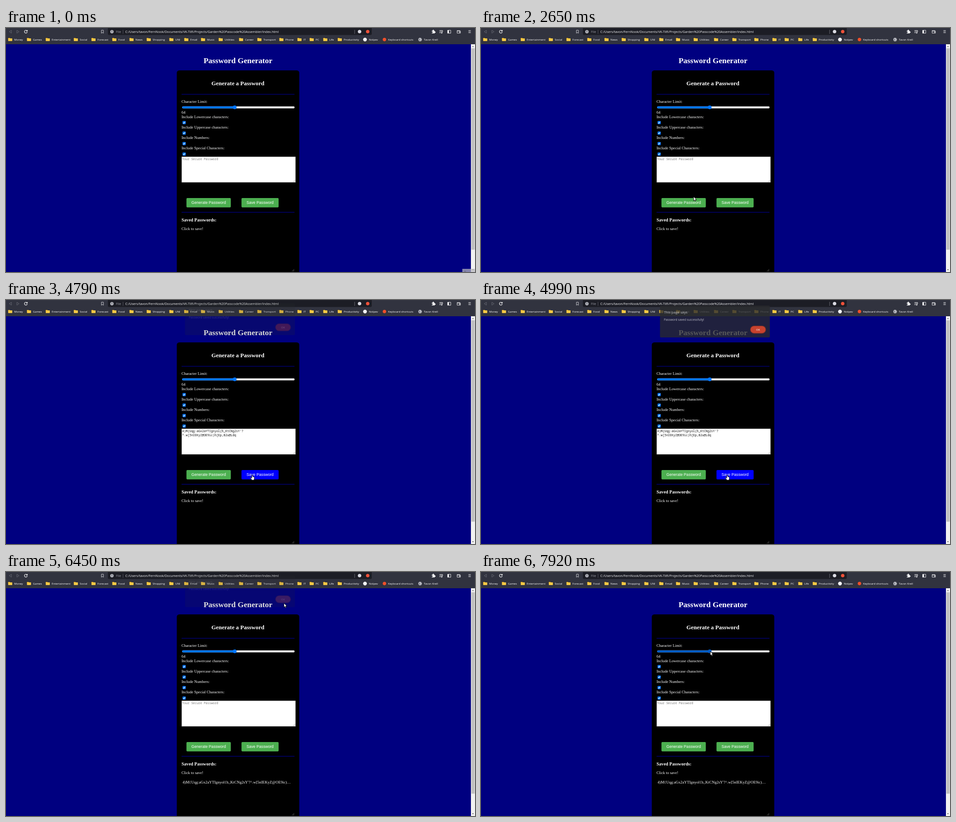
Animation, 1036 px wide and 541 px high, one loop 7.99 s. Source, as an HTML page with a canvas:

```html
<!DOCTYPE html>
<html lang="en">
<head>
<meta charset="utf-8">
<title>Password tool</title>
<style>
html, body { margin: 0; width: 100%; height: 100%; overflow: hidden; background: #000080; }
canvas { display: block; }
</style>
</head>
<body>
<canvas id="stage" width="1036" height="541"></canvas>
<script>
const ctx = document.getElementById('stage').getContext('2d');
const LOOP = 7990;
const SERIF = '"Liberation Serif", serif';
const SANS = '"Liberation Sans", sans-serif';
const UI = '"Open Sans", sans-serif';
const MONO = '"Noto Sans Mono", monospace';

// Moments when the page state changes
const CURSOR_IN = 330, GENERATED = 3010, DIALOG_OPEN = 4740, LEAVE_SAVE = 5330, DIALOG_CLOSE = 6110;
const FADE = 390;
const CLEARED = 6160;

const PASSWORD = ["4)M{Uqg:aGx2aYTIgnyol{h_KtCNg2sY'?", '^.w[5nIEKyZ@OE9ic)h[Ep,B2u@Ldq'];
const SAVED = PASSWORD[0] + PASSWORD[1].slice(0, 18) + '…';
const ADDRESS = 'C:/Users/tavon/FernNook/Documents/VK-Tilfi/Projects/Garden%20Passcode%20Assembler/index.html';

const FOLDERS = {
  Money: 18, Games: 59.5, Entertainment: 101, Social: 163, Forecast: 202, Food: 248, News: 286,
  Shopping: 324, UNI: 374, Email: 407, Music: 444, Utilities: 483, Career: 528, Transport: 568.5,
  Phone: 617, IT: 657, PC: 684, Life: 714, Productivity: 746
};

// Pointer hot spot: time, x, y
const PATH = [
  [330, 1003, 516], [1100, 628, 298], [1590, 497, 310], [2180, 497, 310], [2790, 464, 387],
  [3880, 464, 387], [4460, 544, 388], [5280, 544, 388], [5960, 612, 73], [6090, 614, 69],
  [6780, 614, 69], [7600, 523, 166], [7920, 506.5, 176]
];

const ARROW = new Path2D('M0 0V9.2L2.1 7.3 3.5 10.4 5 9.7 3.7 6.7H6.5Z');
const HAND = new Path2D('M-1 .6Q0-.7 1 .6V3.6L4 4.4Q5 4.8 5 6L4.2 9.2V11.2H-1.8V9.6L-4 6.2Q-4.2 4.8-2.9 5.2L-1 6.9Z');
const IBEAM = new Path2D('M-2-4.3H-.7L0-3.8.7-4.3H2M0-3.8V3.8M-2 4.3H-.7L0 3.8.7 4.3H2');

const clamp = v => Math.min(1, Math.max(0, v));

function text(str, x, y, size, color = '#fff', family = SERIF, style = '', align = 'left') {
  ctx.font = `${style} ${size}px ${family}`;
  ctx.textAlign = align;
  ctx.fillStyle = color;
  ctx.fillText(str, x, y);
}

function box(x, y, w, h, color, radius = 0) {
  ctx.fillStyle = color;
  ctx.beginPath();
  ctx.roundRect(x, y, w, h, radius);
  ctx.fill();
}

function dot(x, y, r, color) {
  ctx.fillStyle = color;
  ctx.beginPath();
  ctx.arc(x, y, r, 0, 7);
  ctx.fill();
}

function line(d, color, width = 1) {
  ctx.strokeStyle = color;
  ctx.lineWidth = width;
  ctx.stroke(new Path2D(d));
}

function shape(d, color) {
  ctx.fillStyle = color;
  ctx.fill(new Path2D(d));
}

function pointerAt(t) {
  const next = PATH.findIndex(p => p[0] > t);
  if (next < 0) return PATH.at(-1).slice(1);
  if (next === 0) return PATH[0].slice(1);
  const [t0, x0, y0] = PATH[next - 1], [t1, x1, y1] = PATH[next];
  const u = (t - t0) / (t1 - t0);
  const e = 0.4 * u + 0.6 * u * u * (3 - 2 * u);
  return [x0 + (x1 - x0) * e, y0 + (y1 - y0) * e];
}

function drawToolbar() {
  box(0, 0, 1036, 36, '#31333f');
  box(225, -4, 583, 19.5, '#1c1d25', 3);
  line('M12 5L7 8.2L12 11.4Z M24 5L29 8.2L24 11.4Z', '#70727c', 0.8);
  line('M46.4 6.2A3.2 3.2 0 1 0 47 9', '#fff', 1.1);
  shape('M47.6 4V7.6H44Z', '#fff');
  line('M210.8 4.8H215.2V11.6L213 9.8L210.8 11.6Z', '#d8d8de', 0.9);
  dot(234, 8.2, 3.7, '#b9bac2');
  line('M234 6V8.8M234 9.6V10.6', '#1c1d25', 0.9);
  text('File', 243, 10.8, 7, '#9a9ba4', UI);
  box(258, 4, 0.7, 9, '#6a6b74');
  text(ADDRESS, 263.5, 10.8, 7.13, '#f4f4f6', UI);
  box(769.7, 4, 0.7, 9, '#8a8b94');
  dot(781, 8, 3.8, '#dcdce4');
  dot(799, 8, 3.8, '#f0523a');

  shape('M940.5 6H942.6A1.5 1.5 0 1 1 945.2 6H947V8A1.4 1.4 0 1 1 947 10.5V12H940.5V10.4A1.4 1.4 0 1 0 940.5 8Z', '#f0f0f2');
  line('M957.5 5.5H965M957.5 8H963M957.5 10.5H960.5M963.4 11V7.4H965.4', '#f0f0f2', 1);
  dot(962.5, 11, 1.2, '#f0f0f2');
  line('M975.5 5H982.5V11.6H975.5Z', '#f0f0f2', 0.9);
  box(975.5, 5, 3, 6.6, '#f0f0f2');
  line('M996.5 5.6H1002.8V7M996.5 5.6V11.4H1003.8V7H996.5M1003.8 8.4H1001.4V10H1003.8', '#f0f0f2', 0.9);
  line('M1021.5 5.5H1026.7M1021.5 8H1026.7M1021.5 10.5H1026.7', '#f0f0f2', 0.9);

  for (const [name, x] of Object.entries(FOLDERS)) {
    box(x - 13.2, 22, 4.2, 3, '#d9a21c', 0.6);
    box(x - 13.2, 22.9, 9, 6, '#f6c945', 0.7);
    bookmark(name, x);
  }
  dot(793, 25.6, 4.2, '#f4f4f6');
  bookmark('Nolpev', 801.5);
  dot(836, 25.6, 3.8, '#f0502a');
  bookmark('Keyboard shortcuts', 844);
  dot(914.7, 25.6, 3.9, '#d0d1d8');
  line('M912 23.4L914.6 25L913.4 27.6L911.6 26M916 22.6L917.6 24.6M915.6 28.4L917.4 26.6', '#3c3e4a', 1);
  bookmark('Tavon Krell', 923);
}

function bookmark(name, x) {
  text(name, x, 27.8, 6.15, '#fff', UI);
}

function drawScrollbar() {
  box(1027, 36, 9, 505, '#f1f1f1');
  box(1028, 45, 7.3, 446.5, '#c1c1c1');
  shape('M1029.6 42L1031.5 39.8L1033.4 42Z', '#666');
  shape('M1029.6 535L1031.5 537.2L1033.4 535Z', '#555');
}

function drawGrip(x, y) {
  line(`M${x - 4.5} ${y}L${x} ${y - 4.5}M${x - 2} ${y}L${x} ${y - 2}`, '#888', 0.7);
}

function drawCheckbox(y) {
  box(390, y - 3.5, 7, 7, '#0075ff', 1.2);
  line(`M391.5 ${y}L393 ${y + 1.6}L395.6 ${y - 1.8}`, '#fff', 1.1);
}

function drawSlider(hover) {
  const blue = hover ? '#005cc8' : '#0075ff';
  box(389, 173.7, 248.5, 4.5, hover ? '#e5e5e5' : '#efefef', 2.2);
  box(389, 173.7, 116, 4.5, blue, 2.2);
  dot(505.2, 175.9, 4.1, blue);
}

function drawButton(label, x, w, hover) {
  box(x, 377, w, 20.7, hover ? '#0000ff' : '#4caf50', 2);
  text(label, x + w / 2, 390.3, 8.63, '#fff', SANS, '', 'center');
}

function drawPage(t, hover) {
  box(0, 36, 1036, 505, '#000080');
  text('Password Generator', 512.4, 78, 17.27, '#fff', SERIF, 'bold', 'center');
  box(377.3, 94, 270.5, 460, '#000', 5.4);
  text('Generate a Password', 512.2, 127.2, 12.95, '#fff', SERIF, 'bold', 'center');
  box(387.8, 146.4, 249.5, 1.1, '#0000a8');
  box(387.8, 407.9, 249.5, 1.1, '#0000a8');

  text('Character Limit:', 387.7, 165.6, 8.63);
  drawSlider(hover.slider);
  text('64', 387.7, 189.8, 8.63);
  ['Lowercase characters', 'Uppercase characters', 'Numbers', 'Special Characters'].forEach((kind, i) => {
    text(`Include ${kind}:`, 387.7, 199.7 + i * 23.25, 8.63);
    drawCheckbox(209.7 + i * 23.25);
  });

  box(387.8, 285.2, 252, 57.4, '#858585');
  box(388.4, 285.8, 250.8, 56.2, '#fff');
  drawGrip(638.6, 341.4);
  if (t >= GENERATED && t < CLEARED) {
    PASSWORD.forEach((row, i) => text(row, 389.3, 293.4 + i * 8.2, 6.61, '#111', MONO));
  } else {
    text('Your Secure Password', 389.3, 293.4, 6.61, '#757575', MONO);
  }

  drawButton('Generate Password', 398.6, 98, hover.generate);
  drawButton('Save Password', 520.2, 82, hover.save);
  text('Saved Passwords:', 387.7, 429.2, 10.1, '#fff', SERIF, 'bold');
  text('Click to save!', 387.7, 448.2, 8.63);
  if (t >= CLEARED) text(SAVED, 390, 469.4, 8.63);
  drawGrip(636.6, 539.4);
}

function drawDialog(t, hover) {
  const opening = clamp((t - DIALOG_OPEN) / FADE);
  const closing = clamp((t - DIALOG_CLOSE) / FADE);
  if (opening === 0 || closing === 1) return;
  ctx.save();
  ctx.globalAlpha = (1 - (1 - opening) ** 1.5) * (1 - closing ** 1.2);
  ctx.translate(0, -10 * (1 - opening + closing));
  box(395.4, 16, 242.6, 70.5, '#292a2d', 2);
  text('This page says', 404, 33.8, 7.75, '#e8eaed', UI);
  text('Password saved successfully!', 404, 49.2, 6.58, '#e8eaed', UI);
  box(594.2, 60.2, 35.6, 18, '#7c2f26', 9);
  box(595.6, 61.6, 32.8, 15.2, hover ? '#ff7452' : '#e2492f', 7.6);
  text('OK', 612, 71.4, 6, '#fff', UI, '600', 'center');
  ctx.restore();
}

function drawPointer(kind, x, y) {
  ctx.save();
  ctx.translate(x, y);
  ctx.lineJoin = 'round';
  ctx.lineWidth = 0.9;
  ctx.strokeStyle = '#000';
  ctx.fillStyle = '#fff';
  const path = { arrow: ARROW, hand: HAND, ibeam: IBEAM }[kind];
  if (kind !== 'ibeam') ctx.fill(path);
  ctx.stroke(path);
  ctx.restore();
}

function draw(t) {
  const [x, y] = pointerAt(t);
  const inside = (l, top, r, b) => x >= l && x <= r && y >= top && y <= b;
  const free = t < LEAVE_SAVE;
  const onSave = inside(520, 377, 602, 398);
  const hover = {
    generate: free && inside(398, 377, 497, 398),
    // The page is frozen while the dialog is open, so the hover stays
    save: free ? onSave : t < CLEARED,
    slider: t > CLEARED && inside(389, 165, 638, 181),
    ok: inside(595, 61, 629, 78)
  };

  drawPage(t, hover);
  drawScrollbar();
  drawToolbar();
  if (t < 70) {
    box(1008, 534, 28, 7, 'rgba(185,185,190,.72)');
    line('M1012 540.5L1014 538.8L1016 540.5', '#55556a', 0.9);
  }
  drawDialog(t, hover.ok);
  if (t < CURSOR_IN) return;
  const kind = !free ? 'arrow'
    : inside(388, 285, 640, 343) ? 'ibeam'
    : hover.generate || onSave ? 'hand' : 'arrow';
  drawPointer(kind, x, y);
}

const start = performance.now();
function tick() {
  draw((performance.now() - start) % LOOP);
  requestAnimationFrame(tick);
}
tick();
</script>
</body>
</html>
```
